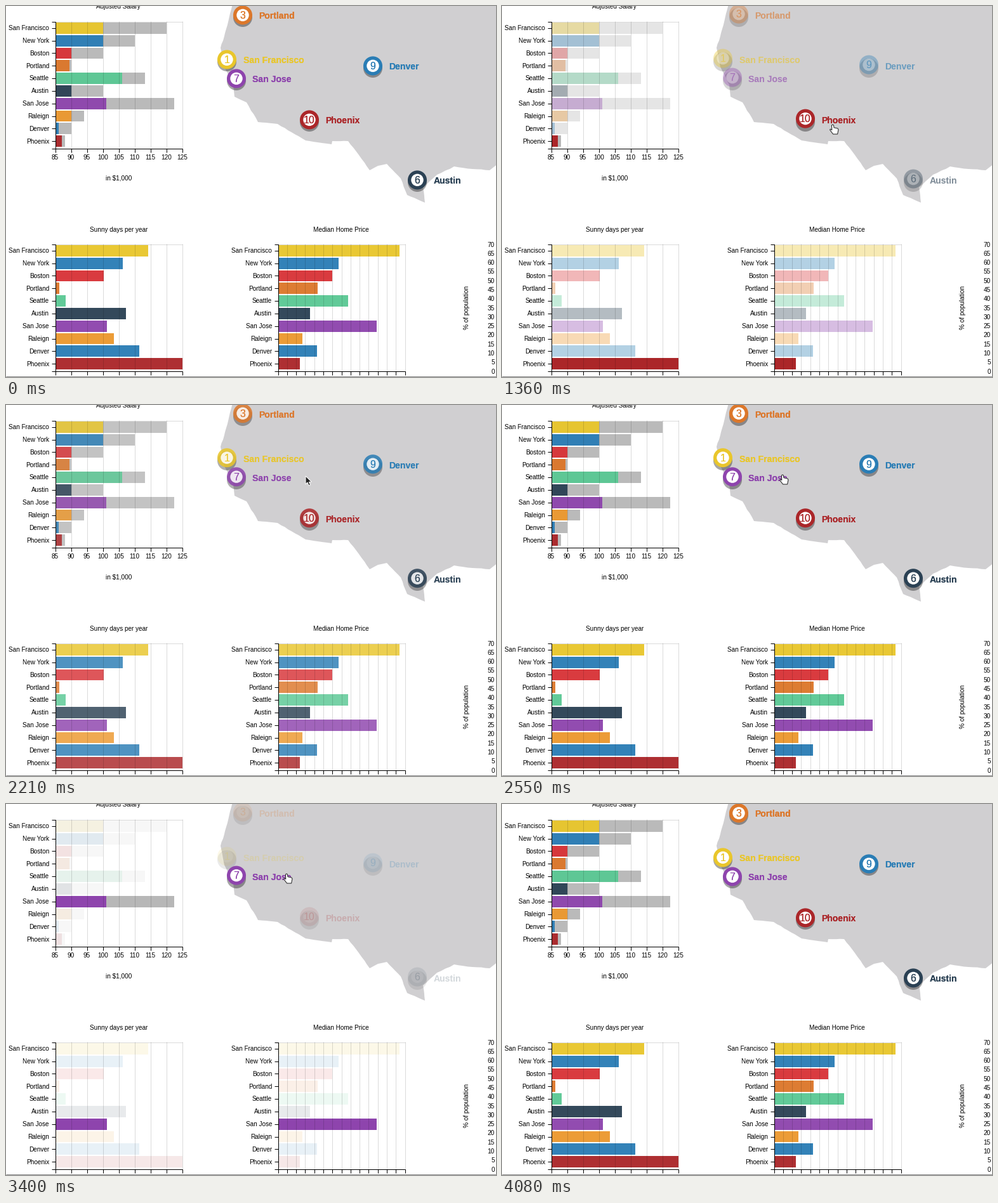
Animation of 772x585 px, one loop 4250 ms. Source, as a matplotlib script:

```python
import numpy as np
import matplotlib.pyplot as plt
from matplotlib.animation import FuncAnimation
from matplotlib.patches import Circle, Polygon, Rectangle

W, H, DPI = 772, 585, 100
FRAMES, STEP = 25, 170
PX = 72 / DPI
SIZE = 200  # side of each plot area
plt.rcParams["font.family"] = "Liberation Sans"

CITIES = ["San Francisco", "New York", "Boston", "Portland", "Seattle",
          "Austin", "San Jose", "Raleign", "Denver", "Phoenix"]
COLORS = ["#e9c62b", "#2a7db5", "#d83337", "#dc772a", "#5ac894",
          "#2b4154", "#8e44ad", "#ec982f", "#2a7db5", "#ab2629"]
SALARY = [120, 110, 100, 90, 113.3, 100, 122.5, 94, 90, 88]
ADJUSTED = [100, 100, 90, 89.5, 106, 90, 101, 90, 86, 87]
SUNNY = [73, 53, 38, 3, 8, 55.5, 40.5, 46, 66, 100]
HOMES = [95.5, 47.5, 42.5, 31, 55, 25, 77.5, 19, 30.5, 17]
PINS = [(3, "Portland", 373, 15), (1, "San Francisco", 348, 85),
        (7, "San Jose", 363, 115), (9, "Denver", 578, 95),
        (10, "Phoenix", 478, 180), (6, "Austin", 648, 275)]

# key points of the coast and border, north-west round to the gulf
COAST = [(357, -5), (347, 36), (338, 66), (344, 96), (358, 124), (360, 143),
         (379, 152), (397, 183), (428, 186), (472, 212), (513, 218),
         (514, 213), (539, 213), (556, 235), (573, 259), (586, 252),
         (600, 249), (622, 272), (632, 298), (660, 310), (657, 286),
         (679, 266), (706, 253), (735, 257), (762, 259), (776, 248),
         (776, -5)]
ARROW = np.array([(0, 0), (0, 13), (3, 10), (5, 15), (7.5, 14),
                  (5.4, 9.3), (9.5, 9.3)])
HAND = np.array([(0, 0), (1.5, 1), (2, 4.8), (8, 6), (9, 8), (7.6, 15),
                 (0.6, 15), (-4.4, 8.3), (-3.6, 7), (-1.2, 8.6), (-1.6, 1)])
# cursor stops: frame, x, y
STOPS = np.array([(3, 760, 290), (5, 510, 223), (7, 521, 187),
                  (10, 521, 187), (13, 472, 112), (15, 442, 110),
                  (21, 442, 110), (23, 600, 572)])

fig = plt.figure(figsize=(W / DPI, H / DPI), dpi=DPI, facecolor="white")
ax = fig.add_axes([0, 0, 1, 1])
ax.set_xlim(0, W)
ax.set_ylim(H, 0)
ax.axis("off")

fades = []  # (artist, city, strength)


def line(xs, ys, color="black", z=5, **kw):
    ax.plot(xs, ys, color=color, lw=PX, zorder=z,
            solid_capstyle="butt", **kw)


def text(x, y, s, size=10, ha="center", z=6, **kw):
    return ax.text(x, y, s, fontsize=size * PX, ha=ha,
                   va=kw.pop("va", "baseline"), zorder=z, **kw)


def fading(artist, city, strength=1):
    ax.add_artist(artist)
    fades.append((artist, city, strength))


def bars(left, top, values, low, high, colors=COLORS):
    band = SIZE / 10.1
    for i, value in enumerate(values):
        width = SIZE * (value - low) / (high - low)
        box = Rectangle((left, top + band * (i + 0.1)), width, band * 0.9,
                        fc=colors[i], ec="none", zorder=2)
        fading(box, CITIES[i], 0.96)


def frame(left, top, title, ticks):
    right, bottom = left + SIZE, top + SIZE + 0.5
    for x in np.linspace(left, right, ticks + 1):
        line([x, x], [bottom, bottom + 6])
        if x > left:
            line([x, x], [top, bottom], z=4, alpha=0.14)
    line([left, right], [top + 0.5] * 2, z=1, alpha=0.14)
    line([left, right], [bottom] * 2)
    line([left - 6, left, left, left - 6],
         [top + 0.5, top + 0.5, bottom, bottom])
    for i, city in enumerate(CITIES):
        y = top + SIZE / 10.1 * (i + 0.55)
        line([left - 6, left], [round(y) - 0.5] * 2)
        text(left - 9.5, y + 3.4, city, ha="right")
    text(left + SIZE / 2 - 0.3, top - 19.5, title)


def rough(points, step=6, amount=0.5):
    rng = np.random.default_rng(4)
    out = []
    for a, b in zip(points, points[1:]):
        a, b = np.array(a), np.array(b)
        n = max(1, int(np.hypot(*(b - a)) // step))
        for k in range(n):
            wobble = rng.uniform(-amount, amount, 2) if k else 0
            out.append(a + (b - a) * k / n + wobble)
    return out + [points[-1]]


def pin(rank, city, x, y):
    color = COLORS[CITIES.index(city)]
    shade = ax.add_patch(Circle((x, y + 3), 15, fc="black", ec="none",
                                zorder=7))
    ring = Circle((x, y), 15, fc=color, ec="none", zorder=8)
    face = Circle((x, y), 9.7, fc="white", ec="none", zorder=9)
    number = text(x, y + 5.8, str(rank), 16, z=10, color=color)
    label = text(x + 25.5, y + 5, city, 14, "left", z=10,
                 color=color, weight="bold")
    for part in (ring, face, number, label):
        fading(part, city)
    return city, shade, ring, face, number, x, y


ax.add_patch(Polygon(rough(COAST), fc="#d0cfd1", ec="none", zorder=1))

x1, x2, y1, y2 = 77.5, 428.5, 24, 375
bars(x1, y1, SALARY, 85, 125, ["#b7b7b7"] * len(CITIES))
bars(x1, y1, ADJUSTED, 85, 125)
frame(x1, y1, "Adjusted Salary", 8)
for k in range(9):
    text(x1 + 25 * k, 241.5, str(85 + 5 * k))
text(x1 + SIZE / 2, 275, r"in \$1,000")

bars(x1, y2, SUNNY, 0, 100)
frame(x1, y2, "Sunny days per year", 8)
bars(x2, y2, HOMES, 0, 100)
frame(x2, y2, "Median Home Price", 14)

for k in range(15):
    text(770, 379.5 + SIZE * k / 14, str(70 - 5 * k), ha="right")
text(726, 475.5, "% of population", rotation=90, va="center")
line([0, W], [584, 584], color="#8a8a8a")

pins = [pin(*spot) for spot in PINS]
arrow = ax.add_patch(Polygon(ARROW, fc="#222222", ec="white", lw=PX,
                             zorder=20))
hand = ax.add_patch(Polygon(HAND, fc="white", ec="#222222", lw=PX,
                            zorder=20))


def ease(i, start, end):
    t = np.clip((i - start) / (end - start), 0, 1)
    return t * t * (3 - 2 * t)


def dimming(i):
    first = ease(i, 6.2, 9) - ease(i, 10, 14)
    second = ease(i, 15, 17.8) - ease(i, 20.5, 24)
    return 1 - 0.89 * (first + second)


def hovered(i):
    if 7 <= i <= 12:
        return "Phoenix"
    return "San Jose" if 16 <= i <= 23 else None


def place_cursor(i):
    shown = STOPS[0, 0] <= i <= STOPS[-1, 0]
    pointing = 7 <= i <= 10 or 15 <= i <= 21
    spot = [np.interp(i, STOPS[:, 0], STOPS[:, k]) for k in (1, 2)]
    for shape, points, on in ((arrow, ARROW, not pointing),
                              (hand, HAND, pointing)):
        shape.set_xy(points + spot)
        shape.set_visible(bool(shown and on))


def update(i):
    level, chosen = dimming(i), hovered(i)
    for artist, city, strength in fades:
        artist.set_alpha(1 if city == chosen else level * strength)
    lift = 2.4 * np.sin(np.pi * (i - 5) / 6) ** 2
    for city, shade, ring, face, number, x, y in pins:
        shade.set_alpha(0.35 if city == chosen else 0.05 + 0.3 * level)
        ring.center = face.center = (x, y - lift)
        number.set_y(y + 5.8 - lift)
    place_cursor(i)
    return []


anim = FuncAnimation(fig, update, frames=FRAMES, interval=STEP,
                     init_func=lambda: update(0), repeat=True,
                     repeat_delay=0, blit=False)
plt.show()
```
